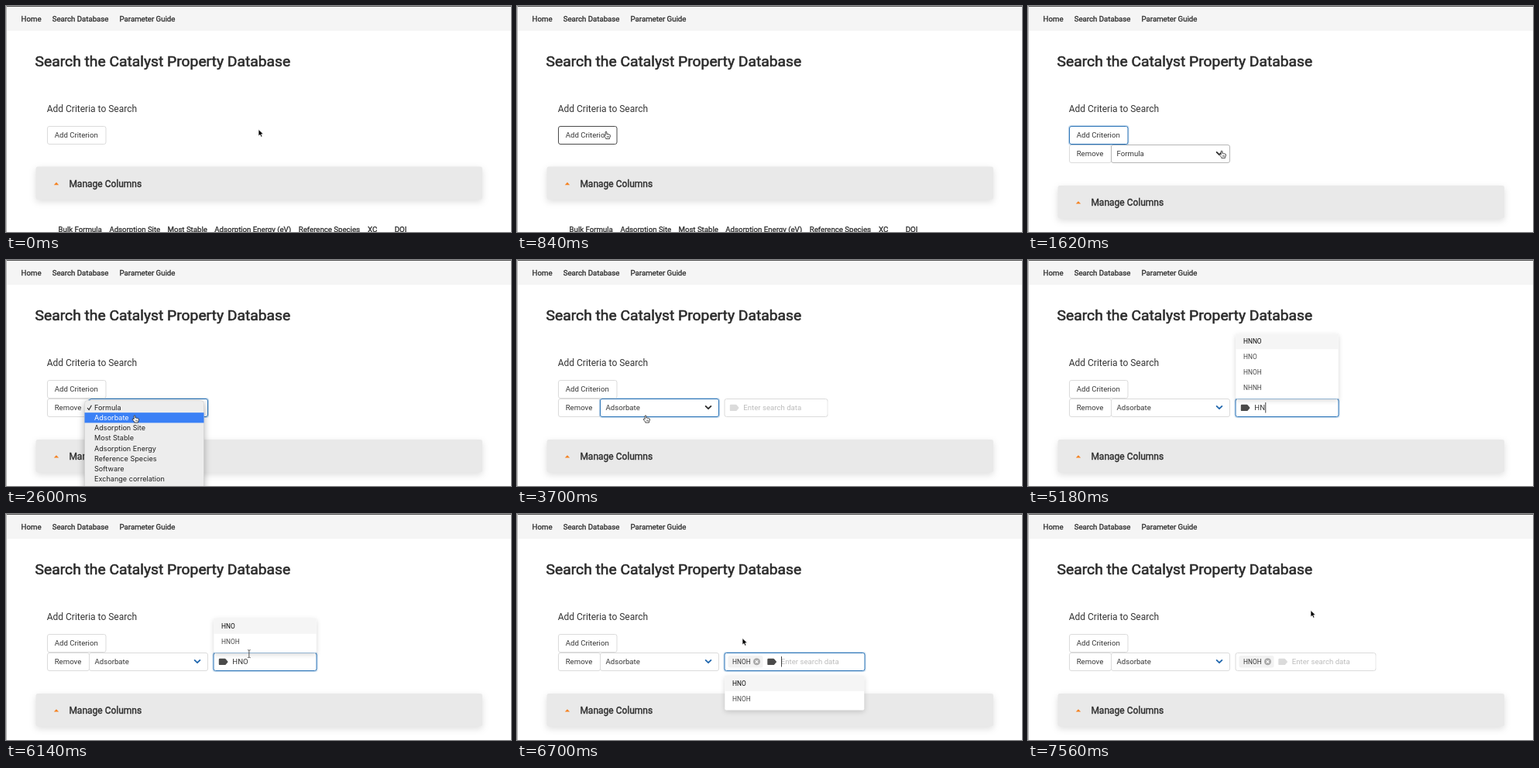
These frames come from a looping animation (652 by 292 pixels, 7580 ms). An HTML page:

```html
<!DOCTYPE html>
<html lang="en">
<head>
<meta charset="utf-8">
<title>Database search</title>
<style>
  html, body { margin: 0; width: 100%; height: 100%; overflow: hidden; background: #fff; }
  svg { display: block; }
  text { font-family: Roboto, sans-serif; font-size: 9.63px; fill: #363636; white-space: pre; }
  .bold { stroke: #2c2c2c; fill: #2c2c2c; stroke-width: .032em; }
  .item { font-size: 8.35px; fill: #4a4a4a; }
  .menu { font-family: Inter, sans-serif; font-size: 9.1px; fill: #222; }
  .card { filter: drop-shadow(0 3px 4px rgba(0,0,0,.13)); }
  .panel { filter: drop-shadow(0 2px 3px rgba(0,0,0,.16)); }
  .popup { filter: drop-shadow(0 3px 5px rgba(0,0,0,.3)); }
</style>
</head>
<body>
<svg id="stage" width="652" height="292" viewBox="0 0 652 292">
  <rect width="652" height="292" fill="#fff"/>
  <rect width="652" height="32" fill="#f5f5f5"/>
  <rect width="652" height="1" fill="#555"/>
  <rect width="1" height="292" fill="#b4b4b4"/>
  <text class="bold" x="19.6" y="19.5">Home</text>
  <text class="bold" x="59.8" y="19.5">Search Database</text>
  <text class="bold" x="146.6" y="19.5">Parameter Guide</text>
  <text class="bold" x="37.6" y="77.8" style="font-size:19.27px">Search the Catalyst Property Database</text>
  <text x="52.7" y="137" style="font-size:12px">Add Criteria to Search</text>
  <g id="live"></g>
</svg>
<script>
const LOOP = 7580, ROW = 19.75;
const BLUE = '#2b74b8', LINE = '#dbdbdb', HOVER = '#b5b5b5', DARK = '#4a4a4a';
const live = document.getElementById('live');

// Moments of the interaction, in ms
const T = { add: 960, open: 1840, pick: 3120, field: 3240, focus: 4180, keyH: 4800,
            keyN: 5180, keyO: 5500, chip: 6560, reset: 6820, blur: 7460 };

const MENU = ['Formula', 'Adsorbate', 'Adsorption Site', 'Most Stable', 'Adsorption Energy',
              'Reference Species', 'Software', 'Exchange correlation'];
const HEADS = [[67.6, 'Bulk Formula'], [133.4, 'Adsorption Site'], [208.5, 'Most Stable'],
               [269.3, 'Adsorption Energy (eV)'], [377.8, 'Reference Species'], [467, 'XC'], [501.8, 'DOI']];
const ALL = ['C', 'CH', 'CH2', 'CH3', 'CHO', 'CO'];
const WITH_H = ['CH', 'CH2', 'CH3', 'CHO', 'COH', 'CHOH'];
const WITH_HN = ['HNNO', 'HNO', 'HNOH', 'NHNH'];
const WITH_HNO = ['HNO', 'HNOH'];

// Pointer moves: start, end, from, to
const MOVES = [
  [100, 680, [326, 159.5], [115, 162]],
  [1260, 1640, [115, 162], [251, 187]],
  [2300, 2600, [251, 187], [166, 200.5]],
  [3700, 4020, [166, 200.5], [325, 190.5]],
  [5980, 6400, [325, 190.5], [291, 160.5]],
  [7000, 7300, [291, 160.5], [365, 124.5]]
];

const clamp = v => Math.max(0, Math.min(1, v));
const ramp = (t, a, b) => clamp((t - a) / (b - a));
const ease = p => p * p * (3 - 2 * p);

function pointer(t) {
  let pos = MOVES[0][2];
  for (const [a, b, from, to] of MOVES) {
    if (t < a) break;
    const p = ease(ramp(t, a, b));
    pos = from.map((v, i) => v + (to[i] - v) * p);
  }
  return pos;
}

const text = (x, y, s, extra = '') => `<text x="${x}" y="${y}" ${extra}>${s}</text>`;
const path = (d, extra) => `<path d="${d}" ${extra}/>`;
const box = (x, y, w, h, r, fill, extra = '') =>
  `<rect x="${x}" y="${y}" width="${w}" height="${h}" rx="${r}" fill="${fill}" ${extra}/>`;

function frame(x, y, w, h, color, ring) {
  const halo = ring ? box(x - .9, y - .9, w + 1.8, h + 1.8, 3.2, 'none', `stroke="${BLUE}" stroke-opacity=".25" stroke-width="1.3"`) : '';
  return halo + box(x, y, w, h, 2.5, '#fff', `stroke="${color}"`);
}

function page(shift) {
  const y = 207.5 + shift;
  return `<g class="card">${box(38.5, y, 576.5, 42.5, 3, '#e9e9e9')}</g>` +
    path(`M61.8 ${y + 23.7}L65 ${y + 20.3}L68.2 ${y + 23.7}Z`, 'fill="#f58220"') +
    text(81.4, y + 26.2, 'Manage Columns', 'class="bold" style="font-size:12px"') +
    HEADS.map(([x, s]) => text(x, 291.6 + shift, s, 'class="bold"')).join('');
}

function select(t, over) {
  const focused = t >= T.open && t < T.focus;
  const edge = focused ? BLUE : over ? HOVER : LINE;
  return frame(53.5, 179.5, 54, 23, LINE) + text(62.7, 194, 'Remove') +
    frame(107.5, 179.5, 153, 23, edge, focused) +
    text(114.5, 194, t < T.field ? 'Formula' : 'Adsorbate') +
    path('M243.6 188.9L247 192.2L250.4 188.9',
      `fill="none" stroke="${over ? '#2a2a2a' : '#1f66ad'}" stroke-width="1.8" stroke-linecap="round" stroke-linejoin="round"`);
}

function popup(t) {
  const alpha = ramp(t, T.open, T.open + 40) * (1 - ramp(t, T.pick, T.pick + 220));
  if (!alpha) return '';
  const hot = pointer(t)[1] > 195.5 ? 1 : 0;
  const rows = MENU.map((s, i) => {
    const y = 184 + i * 13.2, on = i === hot;
    return (on ? box(101.5, y, 154, 13.2, 0, '#3a80f6') : '') +
      text(114, y + 9.8, s, `class="menu" ${on ? 'style="fill:#fff"' : ''}`);
  }).join('');
  const tick = path('M105 191L107.1 193.6L110.4 187.8', `fill="none" stroke="${hot ? '#222' : '#fff'}" stroke-width="1.1"`);
  return `<g opacity="${alpha}"><g class="popup">${box(101.5, 181.5, 154, 130, 4, '#ededed', 'stroke="#c9c9c9" stroke-width=".5"')}</g>${rows}${tick}</g>`;
}

function caretOn(t) {
  if (t < T.keyH) return t < 4500;
  if (t < T.chip) return t < 5820;
  return true;
}

function field(t, over) {
  if (t < T.field) return '';
  const focused = t >= T.focus && t < T.blur, chip = t >= T.chip;
  const w = chip ? 181 : 133, dx = chip ? 48.5 : 0, tx = 292.3 + dx;
  const typed = chip || t < T.keyH ? '' : t < T.keyN ? 'H' : t < T.keyO ? 'HN' : 'HNO';
  const caretX = tx + .6 + [0, 6.86, 13.73, 20.35][typed.length];
  let s = frame(268, 179.5, w, 23, focused ? BLUE : over ? HOVER : LINE, focused);
  if (!focused) s += box(267.5 + w, 182.5, 1, 17, 0, '#fff', 'opacity=".8"');
  if (chip) {
    s += box(272.5, 183, 45, 15.5, 2.5, '#f2f2f2') + text(278, 193.8, 'HNOH', 'class="item" style="fill:#363636"') +
      '<circle cx="309.5" cy="190.8" r="4.5" fill="#a9a9a9"/>' +
      path('M307.8 189.1l3.4 3.4m0-3.4l-3.4 3.4', 'stroke="#fff" stroke-width="1.1"');
  }
  s += path(`M${276 + dx} 186.7h6.5q.8 0 1.3.7l2.9 3.5l-2.9 3.5q-.5.7-1.3.7h-6.5q-1.2 0-1.2-1.2v-6q0-1.2 1.2-1.2Z`,
    `fill="${focused ? DARK : LINE}"`);
  s += typed ? text(tx, 194, typed) : text(tx, 194, 'Enter search data', 'style="fill:#bcbcbc"');
  if (focused && caretOn(t)) s += box(caretX - .3, 184, .9, 13.5, 0, '#333');
  return s;
}

function panel(t, y) {
  if (t < T.focus || t > T.blur + 100) return '';
  const below = t >= T.chip;
  const alpha = (below ? ramp(t, T.chip, T.chip + 120) : ramp(t, T.focus, T.focus + 120)) * (1 - ramp(t, T.blur, T.blur + 90));
  const items = t < T.keyH ? ALL : t < T.keyN ? WITH_H : t < T.keyO ? WITH_HN : t < T.reset ? WITH_HNO : ALL;
  const h = Math.min(116, items.length * ROW + 5), w = below ? 180 : 132.5;
  const top = below ? 209 : 179.5 - h;
  const rows = items.map((s, i) => {
    const ry = top + i * ROW;
    const hover = !below && t > 5980 && y > ry && y < ry + ROW;
    return (i === 0 || hover ? box(268.3, ry, w, ROW, 0, '#f5f5f5') : '') +
      text(278, ry + 12.9, s, `class="item" ${i === 0 || hover ? 'style="fill:#0a0a0a"' : ''}`);
  }).join('');
  return `<g opacity="${alpha}"><g class="panel">${box(268.3, top, w, h, 2, '#fff')}</g>${rows}</g>`;
}

const SHAPES = {
  arrow: path('M0 0V8.6L2 6.8L3.4 9.8L4.9 9.1L3.6 6.2L6.2 6Z', 'fill="#000" stroke="#fff" stroke-width=".7"'),
  hand: path('M-.9 .8Q0 -.3 .9 .8V3.6Q1.8 3 2.4 3.9Q3.4 3.4 4 4.3Q5.4 4 5.5 5.3Q5.5 7.4 4.5 8.4V9.6H-.3V8.6L-2.9 5.6Q-2.8 4.3 -1.6 4.8L-.9 5.5Z',
    'fill="#fff" stroke="#222" stroke-width=".8" stroke-linejoin="round"') +
    path('M1.3 6v2m1.2-2v2m1.2-2v2', 'stroke="#222" stroke-width=".5"'),
  beam: path('M-1.8 -5Q0 -5 0 -4V4Q0 5 -1.8 5M1.8 -5Q0 -5 0 -4M0 4Q0 5 1.8 5', 'fill="none" stroke="#333" stroke-width=".8"')
};

function shape(t, x, y) {
  if (t >= T.chip) return 'arrow';
  if (t >= 5980) return y > 179 ? 'beam' : 'hand';
  if (t >= T.keyH) return '';
  if (x > 268 && t > 3700) return 'beam';
  if (t > T.add) return x < 261 ? 'hand' : 'arrow';
  return x < 129 ? 'hand' : 'arrow';
}

function render(t) {
  const [x, y] = pointer(t), row = t >= T.add;
  const inside = (x0, x1, y0, y1) => x > x0 && x < x1 && y > y0 && y < y1;
  const focused = row && t < T.open + 20;
  const overAdd = t < 2000 && inside(53, 129, 155, 179);
  let s = page(row ? 24.4 : 0);
  if (row) s += select(t, inside(107, 261, 179, 203));
  s += frame(53.5, 155.5, 75.5, 23, focused ? BLUE : overAdd ? DARK : LINE, focused) + text(62.7, 170, 'Add Criterion');
  if (row) s += field(t, inside(268, 401, 179, 203)) + panel(t, y) + popup(t);
  const kind = shape(t, x, y);
  if (kind) s += `<g transform="translate(${x} ${y})">${SHAPES[kind]}</g>`;
  live.innerHTML = s;
}

function tick() {
  render(performance.now() % LOOP);
  requestAnimationFrame(tick);
}
tick();
</script>
</body>
</html>
```
